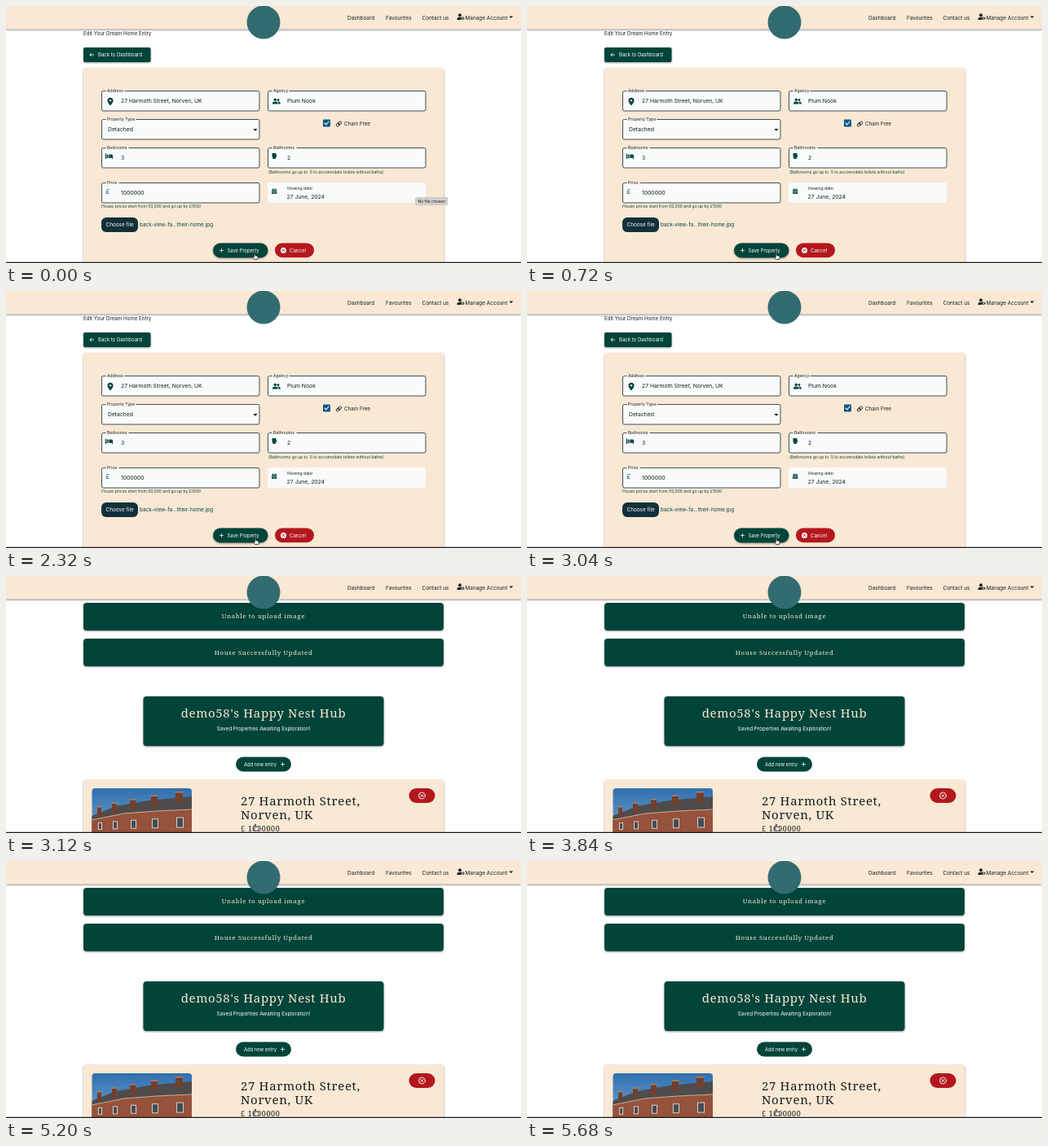
An HTML page that plays this animation: 632x316 px, repeating every 5.76 s.

```html
<!DOCTYPE html>
<html lang="en">
<head>
<meta charset="utf-8">
<title>Property form</title>
<style>
  html, body { margin: 0; width: 100%; height: 100%; overflow: hidden; background: #fff; }
  svg { display: block; width: 632px; height: 316px; }
  text { font-family: Inter, Roboto, sans-serif; fill: #14201f; white-space: pre; }
  .serif { font-family: "Noto Serif", serif; letter-spacing: .65px; }
  .cream { fill: #f9e8d4; }
  .light { fill: #fff; }
  .green { fill: #00443a; }
  .mid { text-anchor: middle; }
  .line { fill: none; stroke-linecap: round; stroke-linejoin: round; }
  .shadow { filter: drop-shadow(0 1px 1px rgba(0, 0, 0, .4)); }
</style>
</head>
<body>
<svg id="stage" viewBox="0 0 632 316">
  <defs>
    <linearGradient id="sky" x2="0" y2="1">
      <stop stop-color="#316fae"/><stop offset="1" stop-color="#75a9d6"/>
    </linearGradient>
    <clipPath id="frame"><rect x="105.5" y="261" width="122.5" height="60" rx="4"/></clipPath>
  </defs>
  <rect width="632" height="316" fill="#fff"/>

  <g id="form">
    <rect class="cream shadow" x="95" y="76" width="442.500" height="260" rx="4"/>
    <rect class="green shadow" x="95" y="51" width="82.500" height="18" rx="2"/>
    <path class="line" d="M107.500 60h-4.500m2-2l-2 2 2 2" stroke="#fff" stroke-width=".8"/>
    <g id="fields"></g>

    <g class="green">
      <path d="M128 122.500c-1.500-2.300-3.500-4-3.500-6.300a3.500 3.500 0 0 1 7 0c0 2.300-2 4-3.500 6.300zm0-7.600a1.300 1.300 0 1 0 .01 0z" fill-rule="evenodd"/>
      <circle cx="330.300" cy="115.300" r="1.700"/><circle cx="334" cy="115.500" r="1.400"/>
      <path d="M327 120.500v-1q0-2 3.300-2t3.300 2v1zm7.300 0v-1.200l-.8-1.700q3.300-.2 3.300 1.800v1.100z"/>
      <path d="M122 181.500h1v4h3.500v-3h3q1.500 0 1.500 1.500v4h-1v-1.200h-7v1.200h-1z"/><circle cx="124.700" cy="183.700" r="1.200"/>
      <path d="M326.500 181h5v2.500h.8q0 2.500-1.600 3l.3 1.500h-3.600v-1.500q-1.200-.8-.9-3z"/>
      <path d="M326.200 225.500h1v-1h1v1h2v-1h1v1h1v1.200h-6zm0 1.800h6v3.700h-6z"/>
    </g>
    <path d="M327.200 228.500h4m-4 1.300h4" stroke="#d5e2df" stroke-width=".5"/>
    <path d="M303.500 151h5l-2.500 2.700z"/>

    <rect x="389" y="139.500" width="9" height="9" rx="1.300" fill="#075985"/>
    <path class="line" d="M391 144l1.800 1.900 3.300-3.900" stroke="#fff" stroke-width="1.100"/>
    <g class="line" stroke="#14201f" stroke-width=".9" transform="rotate(-40 408.500 145)">
      <rect x="404.700" y="143.500" width="4.600" height="3" rx="1.500"/>
      <rect x="407.700" y="143.500" width="4.600" height="3" rx="1.500"/>
    </g>

    <rect x="117" y="260" width="45" height="18" rx="6" fill="#12303a"/>
    <rect class="green shadow" x="254" y="291.500" width="67.500" height="18" rx="9"/>
    <path class="line" d="M262.500 300.500h4m-2-2v4" stroke="#fff" stroke-width=".8"/>
    <rect x="330" y="291.500" width="48" height="17.700" rx="8.850" fill="#b3171d"/>
    <circle cx="340.500" cy="300.400" r="3.500" fill="#fff"/>
    <path class="line" d="M339.200 299.100l2.600 2.600m0-2.600l-2.600 2.600" stroke="#b3171d" stroke-width=".9"/>
    <g id="formText"></g>
    <g id="tip">
      <rect x="502.500" y="235.500" width="39.500" height="9" rx="1" fill="#d3d0cc" stroke="#b9b5b0" stroke-width=".5"/>
      <text x="505.500" y="241.800" font-size="4.950">No file chosen</text>
    </g>
  </g>

  <g id="hub">
    <g class="green">
      <rect class="shadow" x="95" y="33" width="442" height="34" rx="4"/>
      <rect class="shadow" x="95" y="77" width="442" height="34" rx="4"/>
      <rect class="shadow" x="168.500" y="148" width="295" height="61" rx="4"/>
      <rect x="282" y="222.500" width="68" height="18" rx="9"/>
    </g>
    <path class="line" d="M337.500 231.500h4m-2-2v4" stroke="#fff" stroke-width=".8"/>
    <rect class="cream shadow" x="95" y="250.500" width="442.500" height="90" rx="4"/>
    <rect x="494.500" y="261" width="32" height="18" rx="9" fill="#b3171d"/>
    <circle class="line" cx="510.500" cy="270" r="4" stroke="#fff" stroke-width=".9"/>
    <path class="line" d="M509 268.500l3 3m0-3l-3 3" stroke="#fff" stroke-width="1"/>
    <g clip-path="url(#frame)">
      <rect x="105" y="261" width="124" height="60" fill="url(#sky)"/>
      <path d="M105 295L135 283 175 276 228 271V321H105z" fill="#504b4b"/>
      <path d="M105 300L145 292 185 289 228 287V321H105z" fill="#96523b"/>
      <path d="M105 300L145 292 185 289 228 287" class="line" stroke="#c9ad94" stroke-width="1"/>
      <g id="houses"></g>
    </g>
    <g id="hubText"></g>
  </g>

  <rect class="cream" width="632" height="28.500" style="filter: drop-shadow(0 1px 1px rgba(0, 0, 0, .45))"/>
  <circle cx="316" cy="20" r="20.500" fill="#326c70"/>
  <g fill="#14201f">
    <circle cx="557" cy="11.200" r="2"/>
    <path d="M553.500 17v-.8q0-2.400 3.500-2.400 1.300 0 2 .3l-.7 2.900zM617.300 12.500h5l-2.500 2.500z"/>
    <circle class="line" cx="560.500" cy="15.200" r="1.400" stroke="#14201f" stroke-width="1"/>
  </g>
  <g id="navText"></g>
  <rect y="314.800" width="632" height="1.200" fill="#151515"/>
  <path id="hand" d="M-.7 0q.8-.9 1.400.1v2.700l2.700.6q1 .4.8 1.600l-.7 2.600h-3.900l-2-2.900q.2-1 1.700.2z" fill="#fff" stroke="#111" stroke-width=".75"/>
</svg>

<script>
const LOOP = 5760, TIP_OFF = 320, SAVED = 3120;
const $ = id => document.getElementById(id);

function add(parent, tag, attrs, content = "") {
  const el = document.createElementNS("http://www.w3.org/2000/svg", tag);
  for (const key in attrs) el.setAttribute(key, attrs[key]);
  el.textContent = content;
  $(parent).append(el);
}
const write = (parent, rows) => rows.forEach(([x, y, size, content, cls = ""]) =>
  add(parent, "text", { x, y, "font-size": size, class: cls }, content));

function field(x, y, label, width, value, inset) {
  add("fields", "rect", { x: x + .5, y: y + .5, width: 193.500, height: 24.500, rx: 2, fill: "#f8fafc", stroke: "#14262a", "stroke-width": .8 });
  add("fields", "rect", { x: x + 5.5, y: y - 1, width: width + 3, height: 2.600, fill: "#f9f0e5" });
  write("fields", [[x + 7, y + 1.700, 5.1, label], [x + inset, y + 15.200, 6.8, value]]);
}

field(117, 104, "Address", 20, "27 Harmoth Street, Norven, UK", 24);
field(321, 104, "Agency", 18, "Plum Nook", 24);
field(117, 139, "Property Type", 34, "Detached", 8);
field(117, 174, "Bedrooms", 25, "3", 24);
field(321, 174, "Bathrooms", 27, "2", 24);
field(117, 217, "Price", 13, "1000000", 24);
add("fields", "rect", { x: 321, y: 217, width: 194, height: 25, rx: 2, fill: "#f8fafc" });

write("formText", [
  [95, 36, 6.2, "Edit Your Dream Home Entry"],
  [113, 62.2, 6, "Back to Dashboard", "light"],
  [415, 147.400, 6.300, "Chain Free"],
  [322, 205.700, 5, "(Bathrooms go up to .5 to accomodate toilets without baths)", "green"],
  [117, 248.400, 5, "House prices start from 50,000 and go up by £1000", "green"],
  [122.500, 230.700, 7.500, "£", "green"],
  [344.500, 225.800, 5.1, "Viewing date:"],
  [344.500, 236.500, 6.8, "27 June, 2024"],
  [122.500, 271.300, 6.400, "Choose file", "light"],
  [164, 271.300, 6.400, "back-view-fa...their-home.jpg", "green"],
  [271.500, 302.500, 5.850, "Save Property", "light"],
  [348, 302.500, 6.1, "Cancel", "light"],
]);

write("hubText", [
  [316, 52.300, 7.8, "Unable to upload image", "serif cream mid"],
  [316, 96.700, 7.8, "House Successfully Updated", "serif cream mid"],
  [316, 174.300, 15, "demo58's Happy Nest Hub", "serif cream mid"],
  [316, 190.200, 6.300, "Saved Properties Awaiting Exploration!", "light mid"],
  [292, 233.600, 5.8, "Add new entry", "light"],
  [288, 282, 15, "27 Harmoth Street,", "serif"],
  [288, 298.500, 15, "Norven, UK", "serif"],
  [288, 313.500, 9, "£ 1000000", "serif"],
]);

write("navText", [
  [419, 17, 6.450, "Dashboard"],
  [466, 17, 6.450, "Favourites"],
  [510.500, 17, 6.450, "Contact us"],
  [563.500, 17, 6.450, "Manage Account"],
]);

// Chimneys and windows grow towards the near end of the terrace.
for (let i = 0; i < 5; i++) {
  const x = 112 + 16 * i + 2 * i * i, y = 284 - 4.5 * i, w = 5 + i;
  add("houses", "rect", { x, y, width: w, height: 12, fill: "#70402f" });
  add("houses", "rect", { x: x - .5, y: y - 1, width: w + 1, height: 1.500, fill: "#b2805f" });
  add("houses", "rect", { x: x + 1, y: 303 - i * 1.6, width: w, height: 9 + i, fill: "#d9cec1" });
  add("houses", "rect", { x: x + 2, y: 304 - i * 1.6, width: w - 2, height: 7 + i, fill: "#444c55" });
}

const start = performance.now();
function draw() {
  const t = (performance.now() - start) % LOOP;
  const saved = t >= SAVED;
  $("form").style.display = saved ? "none" : "";
  $("hub").style.display = saved ? "" : "none";
  $("tip").style.display = t < TIP_OFF ? "" : "none";
  $("hand").setAttribute("transform", `translate(${t < TIP_OFF ? 305 : 306} ${saved ? 305.500 : 304})`);
  requestAnimationFrame(draw);
}
draw();
</script>
</body>
</html>
```
